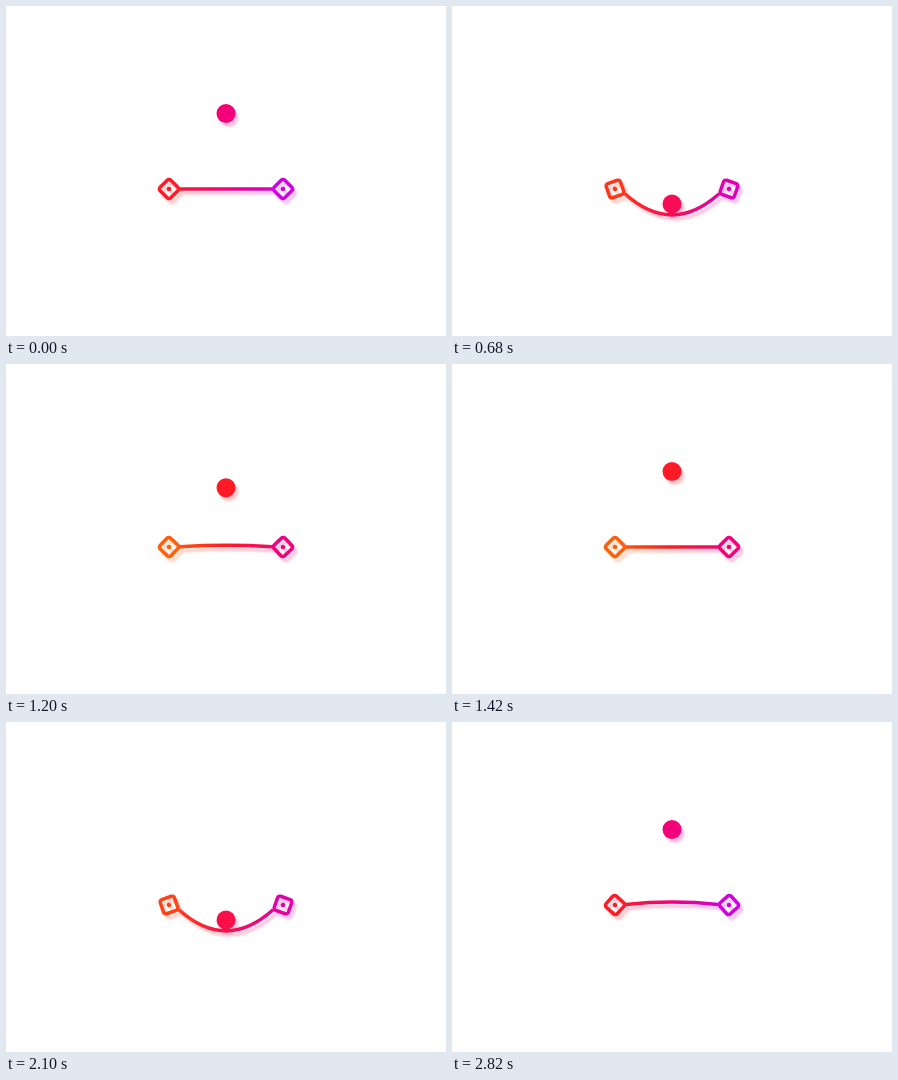
These frames come from a looping animation (440x330 px, 2.84 s). An HTML page:

```html
<!DOCTYPE html>
<html lang="en">
<head>
<meta charset="utf-8">
<title>Trampoline loader</title>
<style>
  html, body { margin: 0; width: 100%; height: 100%; overflow: hidden; background: #fff; }
  svg { display: block; width: 100vw; height: 100vh; }
</style>
</head>
<body>
<svg viewBox="0 0 440 330">
  <defs>
    <linearGradient id="ink" gradientUnits="userSpaceOnUse" x1="163" y1="0" x2="277" y2="0">
      <stop offset="0"/><stop offset=".5"/><stop offset="1"/>
    </linearGradient>
    <filter id="shade" filterUnits="userSpaceOnUse" x="0" y="0" width="440" height="330" color-interpolation-filters="sRGB">
      <feOffset dx="3" dy="4"/>
      <feGaussianBlur stdDeviation="1"/>
      <feComponentTransfer result="soft"><feFuncA type="linear" slope=".25"/></feComponentTransfer>
      <feMerge><feMergeNode in="soft"/><feMergeNode in="SourceGraphic"/></feMerge>
    </filter>
    <g id="knob">
      <rect x="-7.5" y="-7.5" width="15" height="15" rx="2.5" transform="rotate(45)" fill="none" stroke-width="3.5"/>
      <circle r="2.3" stroke="none"/>
    </g>
  </defs>
  <g filter="url(#shade)">
    <path id="wire" fill="none" stroke="url(#ink)" stroke-width="3.5"/>
    <use id="left" href="#knob"/>
    <use id="right" href="#knob"/>
    <circle id="ball" cx="220" r="9.5"/>
  </g>
</svg>
<script>
const BOUNCE = 1420, BOTTOM = 840, RELEASE = 1040;
const TOP = 107.5, DROP = 93, REST = 183, CONTACT = 64.5;
const LEFT = 163, RIGHT = 277, ARM = 11;
const warm = [[255, 95, 10], [255, 26, 37], [244, 0, 122]];
const cool = [[255, 26, 37], [244, 0, 122], [208, 0, 224]];

const $ = id => document.getElementById(id);
const stops = document.querySelectorAll('stop');
const clamp = v => Math.min(1, Math.max(0, v));
const smooth = v => v * v * (3 - 2 * v);
const cubicInOut = v => v < .5 ? 4 * v ** 3 : 1 - 4 * (1 - v) ** 3;

// Bezier easing with handles (a, 0) and (b, 1)
function bezier(v, a, b) {
  let lo = 0, hi = 1;
  for (let i = 0; i < 24; i++) {
    const s = (lo + hi) / 2, r = 1 - s;
    if (3 * r * r * s * a + 3 * r * s * s * b + s ** 3 < v) lo = s; else hi = s;
  }
  return smooth(lo);
}

function ballDrop(t) {
  return DROP * (t < BOTTOM
    ? cubicInOut(t / BOTTOM)
    : 1 - bezier((t - BOTTOM) / (BOUNCE - BOTTOM), .48, .35));
}

// Free vibration of the wire after the ball has left it
function vibration(t) {
  if (t > BOTTOM && t < RELEASE) return 0;
  const u = (t - RELEASE + BOUNCE) % BOUNCE;
  return -(3.8 + 9 * Math.exp(-u / 100)) * Math.sin(2 * Math.PI * u / 152);
}

function draw(now) {
  const time = now % (2 * BOUNCE), t = time % BOUNCE;
  const drop = ballDrop(t);
  const dip = Math.max(vibration(t), drop - CONTACT);

  const turn = dip * Math.PI / 180;
  const dx = ARM * Math.cos(turn), endY = REST + ARM * Math.sin(turn);
  const bendY = 2 * (REST + dip) - endY;
  $('wire').setAttribute('d', `M${LEFT + dx} ${endY}Q220 ${bendY} ${RIGHT - dx} ${endY}`);
  $('left').setAttribute('transform', `translate(${LEFT} ${REST}) rotate(${dip})`);
  $('right').setAttribute('transform', `translate(${RIGHT} ${REST}) rotate(${-dip})`);
  $('ball').setAttribute('cy', TOP + drop);

  const shift = smooth(clamp((t - 500) / 400));
  const heat = time < BOUNCE ? shift : 1 - shift;
  const colors = cool.map((c, i) => `rgb(${c.map((v, k) => Math.round(v + (warm[i][k] - v) * heat))})`);
  colors.forEach((c, i) => stops[i].setAttribute('stop-color', c));
  for (const [id, c] of [['left', colors[0]], ['ball', colors[1]], ['right', colors[2]]]) {
    $(id).setAttribute('fill', c);
    if (id !== 'ball') $(id).setAttribute('stroke', c);
  }
}

let start;
function tick(now) {
  start ??= now;
  draw(now - start);
  requestAnimationFrame(tick);
}
draw(0);
requestAnimationFrame(tick);
</script>
</body>
</html>
```
